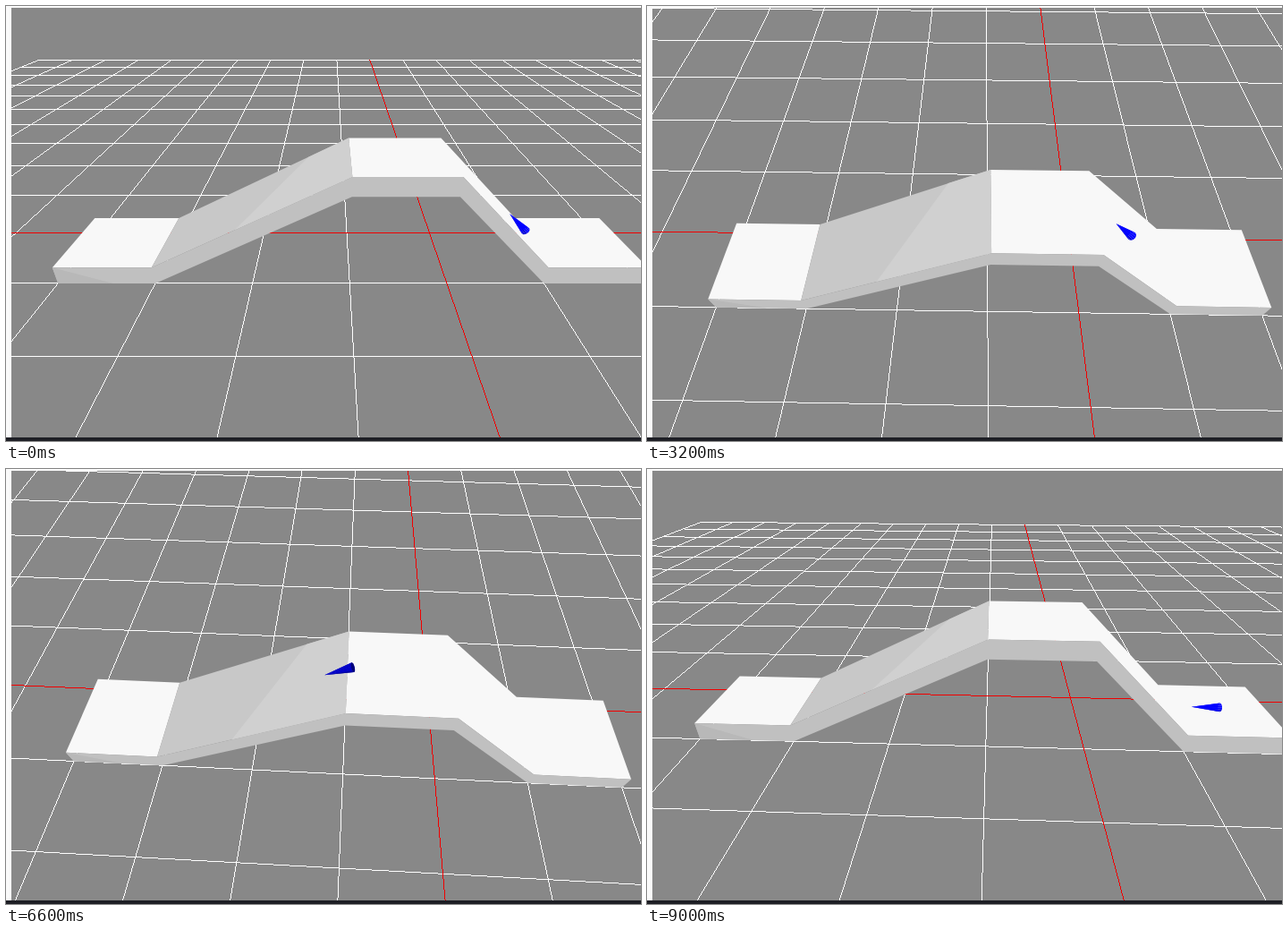
Animation, 710 px wide and 486 px high, one loop 9.1 s. Source, as an HTML page with a canvas:

```html
<!DOCTYPE html>
<html lang="en">
<head>
<meta charset="utf-8">
<title>Cone on a bridge</title>
<style>
html, body { margin: 0; width: 100%; height: 100%; overflow: hidden; background: #fafafa; }
canvas { display: block; }
</style>
</head>
<body>
<canvas id="stage" width="710" height="486"></canvas>
<script>
const ctx = document.getElementById('stage').getContext('2d');
const LOOP = 9100, STEP = 100;
const VIEW = { left: 6, top: 2, right: 710, bottom: 482 };

// Orbit camera: fixed pivot, distance and focal length
const PIVOT = [-1.2, 0.033, -0.17], DIST = 5.87, FOCAL = 530, CX = 362, CY = 242, NEAR = 0.2;
// time, pitch, yaw
const CAMERA = [
  [0, 30.4, 0], [2600, 30.4, 0], [2900, 39.8, 0], [3700, 78.2, 2.52], [6200, 78.2, 2.52],
  [6900, 34.4, 3.4], [7200, 34.4, 3.4], [7600, 30.1, 2.46], [LOOP, 30.1, 2.46]
];
let sp, cp, sy, cy;

function setCamera(t) {
  const i = CAMERA.findIndex(k => k[0] > t);
  const a = CAMERA[i - 1], b = CAMERA[i];
  const u = (t - a[0]) / (b[0] - a[0]);
  const angle = n => (a[n] + (b[n] - a[n]) * u) * Math.PI / 180;
  const pitch = angle(1), yaw = angle(2);
  sp = Math.sin(pitch); cp = Math.cos(pitch);
  sy = Math.sin(yaw); cy = Math.cos(yaw);
}

function toView([x, y, z]) {
  const dx = x - PIVOT[0], dy = y - PIVOT[1], dz = z - PIVOT[2];
  const fwd = -dx * sy - dz * cy;
  return [dx * cy - dz * sy, -fwd * sp - dy * cp, DIST + fwd * cp - dy * sp];
}
const toScreen = ([x, y, d]) => [CX + FOCAL * x / d, CY + FOCAL * y / d];
const project = p => toScreen(toView(p));

// One-pixel line without smoothing
function pixelLine([x0, y0], [x1, y1]) {
  const flat = Math.abs(x1 - x0) > Math.abs(y1 - y0);
  if (flat ? x0 > x1 : y0 > y1) [x0, y0, x1, y1] = [x1, y1, x0, y0];
  if (flat) {
    const k = (y1 - y0) / (x1 - x0), end = Math.min(VIEW.right, x1);
    for (let x = Math.max(VIEW.left, Math.round(x0)); x <= end; x++)
      ctx.fillRect(x, Math.round(y0 + (x - x0) * k), 1, 1);
  } else {
    const k = (x1 - x0) / (y1 - y0), end = Math.min(VIEW.bottom, y1);
    for (let y = Math.max(VIEW.top, Math.round(y0)); y <= end; y++)
      ctx.fillRect(Math.round(x0 + (y - y0) * k), y, 1, 1);
  }
}

function groundLine(p, q, color) {
  let a = toView(p), b = toView(q);
  if (a[2] < b[2]) [a, b] = [b, a];
  if (a[2] < NEAR) return;
  if (b[2] < NEAR) {
    const u = (a[2] - NEAR) / (a[2] - b[2]);
    b = a.map((v, i) => v + (b[i] - v) * u);
  }
  ctx.fillStyle = color;
  pixelLine(toScreen(a), toScreen(b));
}

function drawGrid() {
  const cross = (n, color) => {
    groundLine([n, 0, -10], [n, 0, 10], color);
    groundLine([-10, 0, n], [10, 0, n], color);
  };
  for (let n = -10; n <= 10; n++) if (n) cross(n, '#fff');
  cross(0, '#f00000');
}

function face(points, color) {
  ctx.beginPath();
  for (const p of points) {
    const [x, y] = project(p);
    ctx.lineTo(x + 0.5, y + 0.5);
  }
  ctx.closePath();
  ctx.fillStyle = color;
  ctx.fill();
}

// Bridge profile from right to left: x and top height
const PROFILE = [[2, 0.2], [1, 0.2], [0, 1.2], [-1, 1.2], [-3, 0.2], [-4, 0.2]];
const THICK = 0.2;

function drawBridge() {
  const back = PROFILE.map(([x, y]) => [x, y, 0]);
  const front = PROFILE.map(([x, y]) => [x, y, 1]);
  const under = PROFILE.map(([x, y]) => [x, y - THICK, 1]);
  const strip = (a, b, color) =>
    face([...back.slice(a, b + 1), ...front.slice(a, b + 1).reverse()], color);
  strip(0, 3, '#f8f8f8');
  strip(4, 5, '#f8f8f8');
  strip(3, 4, '#c8c8c8');
  const ramp = (u, z) => [-3 + 2 * u, 0.2 + u, z];
  face([ramp(0.78, 0), ramp(1, 0), ramp(1, 1), ramp(0.44, 1)], '#d0d0d0');
  face([...front, ...under.reverse()], '#c0c0c0');
  face([[-4, 0.2, 1], [-4, 0, 1], [-3.43, 0, 1]], '#b8b8b8');
}

const LEGS = PROFILE.slice(1).map(([x, y], i) => Math.hypot(x - PROFILE[i][0], y - PROFILE[i][1]));
const LENGTH = LEGS.reduce((a, b) => a + b);
const PERIOD = 3050, START = 1.31;

// Constant speed along the profile, turning at both ends
function conePose(t) {
  let s = (START + t / PERIOD * 2 * LENGTH) % (2 * LENGTH);
  const left = s < LENGTH;
  if (!left) s = 2 * LENGTH - s;
  let i = 0;
  while (i < LEGS.length - 1 && s > LEGS[i]) s -= LEGS[i++];
  const [ax, ay] = PROFILE[i], [bx, by] = PROFILE[i + 1];
  const ux = (bx - ax) / LEGS[i], uy = (by - ay) / LEGS[i];
  const turn = left ? 1 : -1;
  return { x: ax + ux * s, y: ay + uy * s, dx: ux * turn, dy: uy * turn, nx: uy, ny: -ux, left };
}

function drawCone(t) {
  const c = conePose(t), half = 0.15, r = 0.047, lift = 0.035, z = 0.52;
  const at = (along, up, side) =>
    [c.x + c.dx * along + c.nx * (up + lift), c.y + c.dy * along + c.ny * (up + lift), z + side];
  const ring = [];
  for (let i = 0; i < 12; i++) {
    const a = i * Math.PI / 6;
    ring.push(at(-half, r * Math.cos(a), r * Math.sin(a)));
  }
  const tip = at(half, 0, 0);
  const bright = c.left && c.x > 0;
  const upper = bright ? '#0000ff' : '#0000c8', lower = bright ? '#0000d8' : '#0000a0';
  ring.forEach((p, i) => {
    const mid = i > 2 && i < 6;
    face([tip, p, ring[(i + 1) % 12]], mid ? lower : upper);
  });
  // Base disc, when it faces the viewer
  const eye = [PIVOT[0] + DIST * cp * sy, PIVOT[1] + DIST * sp];
  const base = at(-half, 0, 0);
  if ((eye[0] - base[0]) * c.dx + (eye[1] - base[1]) * c.dy < 0)
    face(ring, bright ? '#0000e0' : '#000078');
}

function draw(t) {
  ctx.fillStyle = '#fafafa';
  ctx.fillRect(0, 0, 710, 486);
  ctx.fillStyle = '#1e1f25';
  ctx.fillRect(0, VIEW.bottom, 710, 4);
  ctx.save();
  ctx.beginPath();
  ctx.rect(VIEW.left, VIEW.top, VIEW.right - VIEW.left, VIEW.bottom - VIEW.top);
  ctx.clip();
  ctx.fillStyle = '#888';
  ctx.fillRect(0, 0, 710, 486);
  setCamera(t);
  drawGrid();
  drawBridge();
  drawCone(t);
  ctx.restore();
}

const begin = performance.now();
let shown = -1;
function tick() {
  const t = Math.floor((performance.now() - begin) % LOOP / STEP) * STEP;
  if (t !== shown) draw(shown = t);
  requestAnimationFrame(tick);
}
tick();
</script>
</body>
</html>
```
